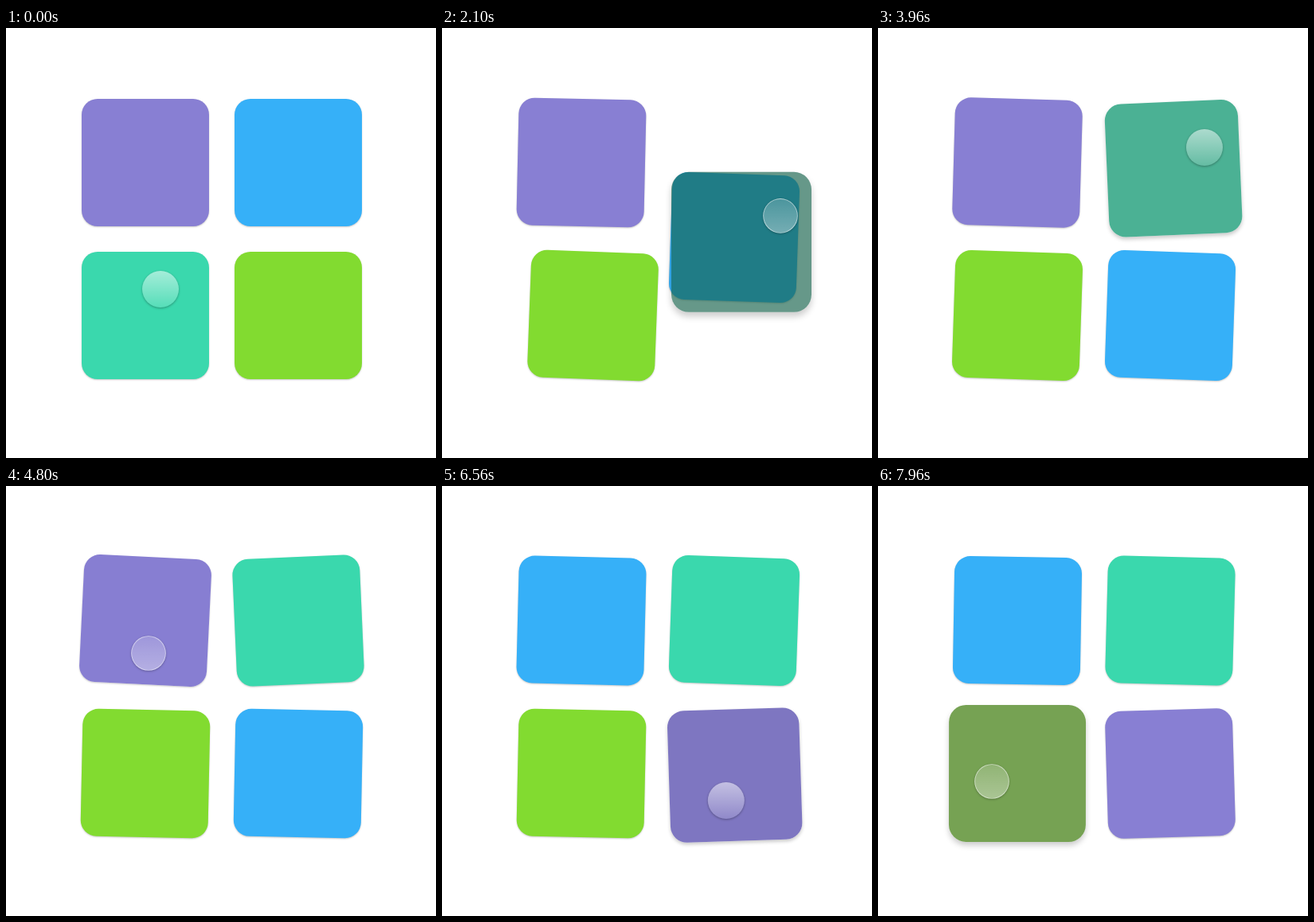
Animation, 540 px wide and 540 px high, one loop 8000 ms. Source, as an HTML page:

```html
<!DOCTYPE html>
<html lang="en">
<head>
<meta charset="utf-8">
<title>Drag to reorder</title>
<style>
  html, body { margin: 0; width: 100%; height: 100%; overflow: hidden; background: #fff; }
  #stage { position: relative; width: 540px; height: 540px; overflow: hidden; background: #fff; }
  .tile { position: absolute; left: -80px; top: -80px; width: 160px; height: 160px; border-radius: 20px; }
  #touch { position: absolute; left: -23px; top: -23px; width: 46px; height: 46px; z-index: 3; }
  #touch i { position: absolute; inset: 0; border-radius: 50%; box-sizing: border-box; }
  .idle {
    background: linear-gradient(rgba(255,255,255,.54), rgba(255,255,255,.14));
    box-shadow: 0 1px 3px rgba(0,0,0,.32);
  }
  .held {
    border: 1px solid rgba(255,255,255,.5);
    background: linear-gradient(rgba(255,255,255,.2), rgba(255,255,255,.38));
    box-shadow: 0 1px 3px rgba(0,0,0,.28);
  }
</style>
</head>
<body>
<div id="stage"><div id="touch"><i class="idle"></i><i class="held"></i></div></div>
<script>
const LOOP = 8000;
const TL = [175, 169], TR = [367, 169], BL = [175, 361], BR = [367, 361];

const clamp = v => Math.max(0, Math.min(1, v));
const mix = (a, b, k) => a + (b - a) * k;
const mixAll = (a, b, k) => a.map((v, i) => mix(v, b[i], k));
const smooth = k => k * k * (3 - 2 * k);
const cubic = k => k < .5 ? 4 * k ** 3 : 1 - 4 * (1 - k) ** 3;
const ramp = (t, start, length) => clamp((t - start) / length);

// time, x, y of the finger
const path = [
  [0, 194, 328], [1400, 194, 328], [1900, 392, 318], [2100, 425, 236], [2700, 424, 172],
  [3860, 410, 152], [3960, 410, 150], [4240, 179, 210], [5250, 179, 210], [5560, 277, 316],
  [5950, 372, 400], [6440, 373, 408], [6560, 357, 395], [7280, 118, 378], [7380, 67, 374],
  [7480, 143, 371], [LOOP, 143, 371]
];
const presses = [[100, 3860], [4290, 6450], [7480, 9000]];

// up/down: lift and drop times; moves: start, destination; sway: time, angle
const tiles = [
  { rgb: [136, 127, 211], dark: [58, 49, 137], home: TL, moves: [], up: 4790, down: 6440, drop: BR,
    grab: [4, 41], sway: [[0, 2.2], [5200, 2.2], [6300, -2.25], [7960, -2.8]], amp: 1.1, peak: 40 },
  { rgb: [54, 176, 248], home: TR, moves: [[1952, BR], [5700, TL]],
    sway: [[0, 1.55]], amp: .6, peak: 150 },
  { rgb: [130, 219, 48], dark: [50, 99, 13], home: BR, moves: [[1881, BL]], up: 7827, down: 9000, drop: BL,
    grab: [-32, 10], sway: [[0, 1.55]], amp: .7, peak: 160 },
  { rgb: [58, 216, 173], dark: [20, 98, 74], home: BL, moves: [], up: 630, down: 3855, drop: TR,
    grab: [19, -33], sway: [[0, 0], [3000, -3.6], [3960, -3.6], [5560, -.4], [6560, 1.4], [7960, 1.5]],
    amp: .7, peak: 100 }
];

// monotone cubic curve through the path, one axis at a time
function along(t, axis) {
  const slope = i => (path[i + 1][axis] - path[i][axis]) / (path[i + 1][0] - path[i][0]);
  const tangent = i => {
    if (i < 1 || i > path.length - 2) return 0;
    const a = slope(i - 1), b = slope(i);
    return a * b > 0 ? 2 * a * b / (a + b) : 0;
  };
  let i = 0;
  while (i < path.length - 2 && t >= path[i + 1][0]) i++;
  const span = path[i + 1][0] - path[i][0], k = (t - path[i][0]) / span;
  return mix(path[i][axis], path[i + 1][axis], smooth(k))
    + span * k * (1 - k) * ((1 - k) * tangent(i) - k * tangent(i + 1));
}
const finger = t => [along(t, 1), along(t, 2)];

function track(keys, t) {
  let value = keys[0][1];
  for (let i = 1; i < keys.length; i++) {
    const [start, from] = keys[i - 1], [end, to] = keys[i];
    if (t >= start) value = mix(from, to, ramp(t, start, end - start));
  }
  return value;
}

const stage = document.getElementById('stage');
const touch = document.getElementById('touch');
const [idle, held] = touch.children;
for (const tile of tiles) {
  tile.el = document.createElement('div');
  tile.el.className = 'tile';
  stage.insertBefore(tile.el, touch);
}

function drawTile(tile, t) {
  let pos = tile.home;
  for (const [start, to] of tile.moves) pos = mixAll(pos, to, cubic(ramp(t, start, 300)));

  let lift = 0;
  if (tile.up) {
    lift = smooth(ramp(t, tile.up, 200)) - smooth(ramp(t, tile.down, 200));
    if (t >= tile.down) pos = tile.drop;
    if (lift > 0) {
      const [x, y] = finger(Math.min(t, tile.down));
      pos = mixAll(pos, [Math.min(376, x - tile.grab[0]), y - tile.grab[1]], lift);
    }
  }

  const jiggle = track(tile.sway, t) + tile.amp * Math.cos((t - tile.peak) / 240 * 2 * Math.PI);
  const angle = jiggle * ramp(t, 630, 120) * clamp(2 - 2.6 * lift);
  const color = mixAll(tile.rgb, tile.dark || tile.rgb, lift).map(Math.round);
  const s = tile.el.style;
  s.transform = `translate(${pos[0]}px,${pos[1]}px) rotate(${angle}deg) scale(${1 + lift * .1})`;
  s.background = `rgba(${color},${1 - .35 * lift})`;
  s.boxShadow = `0 ${mix(1, 5, lift)}px ${mix(2, 8, lift)}px rgba(0,0,0,${mix(.22, .2, lift)})`;
  s.zIndex = lift > 0 ? 2 : 1;
}

function draw(t) {
  for (const tile of tiles) drawTile(tile, t);
  const [x, y] = finger(t);
  let press = 0;
  for (const [start, end] of presses) press += ramp(t, start - 30, 90) - ramp(t, end, 90);
  if (t < 100) press = 0;
  touch.style.transform = `translate(${x}px,${y}px) scale(${1 - .05 * press})`;
  idle.style.opacity = 1 - press;
  held.style.opacity = press;
}

function tick() {
  draw(performance.now() % LOOP);
  requestAnimationFrame(tick);
}
tick();
</script>
</body>
</html>
```
